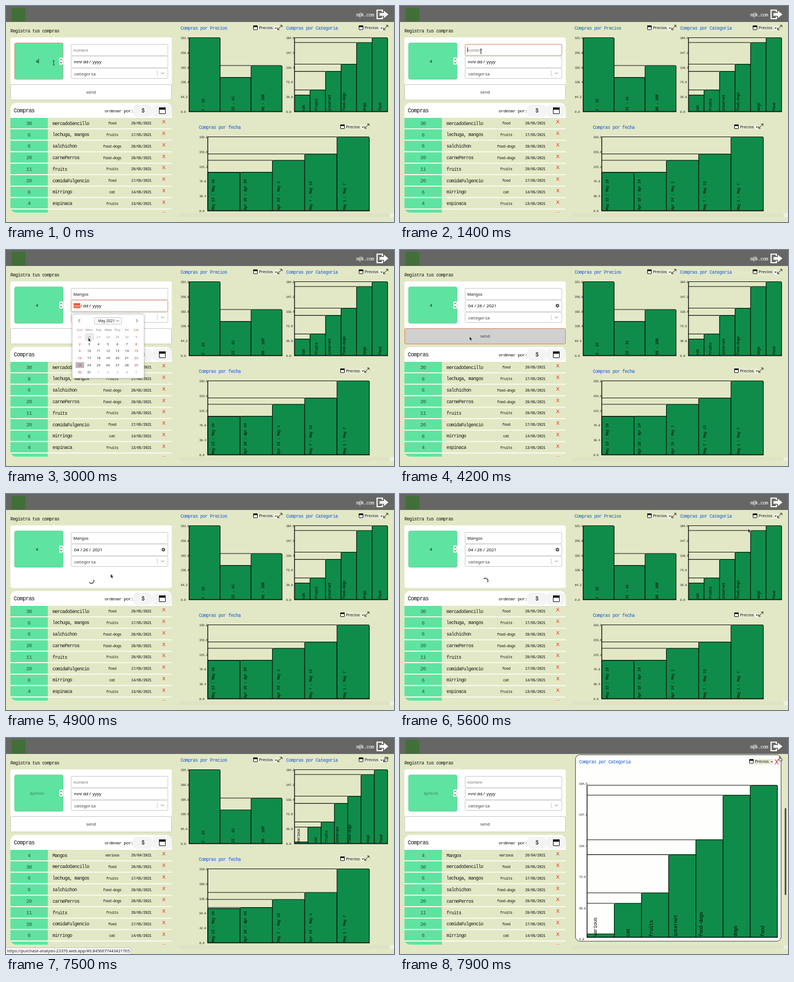
Recreate the animation shown at these times as an HTML page with a canvas. Size 700 by 392 pixels, loop 8 s.

```html
<!DOCTYPE html>
<html lang="es">
<head>
<meta charset="utf-8">
<title>Registro de compras</title>
<style>
html, body { margin: 0; width: 100%; height: 100%; overflow: hidden; background: #e2e8c5; }
canvas { display: block; }
</style>
</head>
<body>
<canvas id="stage" width="700" height="392"></canvas>
<script>
const g = document.getElementById('stage').getContext('2d');
const MONO = '"Liberation Mono", monospace';
const SANS = '"Noto Sans", "Open Sans", sans-serif';
const PAPER = '#e2e8c5', MINT = '#5fe3a1', GREEN = '#0f8c49', ORANGE = '#dd8262', LINE = '#c9c9c9';
const LOOP = 8000, STEP = 100;
const at = { nameFocus: 1200, typing: 1500, dateFocus: 2500, popup: 2600, picked: 3200,
  hover: 3800, press: 4100, loading: 4400, saved: 6500, link: 7300, modal: 7700 };

function box(x, y, w, h, fill, stroke, r = 0, line = 1) {
  g.beginPath();
  g.roundRect(x, y, w, h, r);
  if (fill) { g.fillStyle = fill; g.fill(); }
  if (stroke) { g.strokeStyle = stroke; g.lineWidth = line; g.stroke(); }
}

function setFont(size, font) {
  g.font = size + 'px ' + font;
  g.letterSpacing = font === MONO ? -.07 * size + 'px' : '0px';
}

function text(s, x, y, size = 8.3, color = '#111', align = 'left', font = MONO) {
  setFont(size, font);
  g.fillStyle = color;
  g.textAlign = align;
  g.fillText(s, x, y);
}

function path(points, color, line = 1, fill) {
  g.beginPath();
  for (let i = 0; i < points.length; i += 2) g.lineTo(points[i], points[i + 1]);
  if (fill) { g.closePath(); g.fillStyle = fill; g.fill(); }
  g.strokeStyle = color;
  g.lineWidth = line;
  g.stroke();
}

function placed(x, y, draw) {
  g.save();
  g.translate(x, y);
  draw();
  g.restore();
}

function calendarIcon(x, y, s) {
  box(x + .5, y + .5, s - 1, s - 1, '#fff', '#111', .5);
  box(x, y, s, s * .36, '#111');
}

function header() {
  box(0, 0, 700, 29, '#666664');
  box(10, 3, 25, 25, '#416f38');
  text('m@k.com', 632, 19, 8.6, '#fff');
  path([679, 11, 679, 7.5, 669.5, 7.5, 669.5, 23, 679, 23, 679, 19.5], '#fff', 2.2);
  path([674, 13, 682, 13, 682, 9, 689.5, 15.3, 682, 21.5, 682, 17.5, 674, 17.5], '#fff', .5, '#fff');
}

function form(t) {
  const saved = t >= at.saved, loading = t >= at.loading && !saved;
  const caret = t % 1000 < 500;
  text('Registra tus compras', 8, 47.5);
  box(8, 57, 291, loading ? 113.5 : 86, '#fff', null, 3);

  box(15.5, 67, 87.5, 66, MINT, t < at.nameFocus ? ORANGE : '#55cc91', 3, .8);
  if (saved) text('$precio', 56, 102.5, 7.3, '#3d7f60', 'center', SANS);
  else text('4', 56, 103, 7.6, '#111', 'center', SANS);
  if (t < at.nameFocus && caret) box(58.3, 96, .9, 8, '#111');
  box(96, 93.5, 7, 13, '#f4f4f0', null, 1.5);
  path([98, 98, 99.5, 96, 101, 98], '#333', .9);
  path([98, 102, 99.5, 104, 101, 102], '#333', .9);

  const nameOn = t >= at.nameFocus && t < at.dateFocus;
  const dateOn = t >= at.dateFocus && t < at.press;
  box(117.5, 69.5, 174.5, 20.5, '#fff', nameOn ? ORANGE : LINE, 2);
  const typed = saved ? '' : 'Mangos'.slice(0, Math.max(0, Math.floor((t - at.typing) / 100)));
  text(typed || 'nombre', 121.5, 82.5, 7.2, typed ? '#111' : '#777', 'left', SANS);
  if (nameOn && caret) box(121.5 + (typed ? g.measureText(typed).width : 0), 75, .9, 9, '#111');

  box(117.5, 91, 174.5, 21, '#fff', dateOn ? ORANGE : LINE, 2);
  const filled = t >= at.picked && !saved;
  const editing = dateOn && !filled;
  if (editing) box(122, 96.5, 12, 9, '#e8552b');
  const parts = filled ? ['04', '26', '2021'] : ['mm', 'dd', 'yyyy'];
  [122.8, 139, 156].forEach((x, i) =>
    text(parts[i], x, 104, filled || i ? 7.9 : 6.6, editing && !i ? '#fff' : '#000', 'left', SANS));
  text('/', 134.5, 104, 7.9, '#000', 'left', SANS);
  text('/', 150, 104, 7.9, '#000', 'left', SANS);
  if (filled) {
    g.beginPath();
    g.arc(284, 101, 3.2, 0, 7);
    g.fillStyle = '#555';
    g.fill();
    path([282.8, 99.8, 285.2, 102.2], '#fff', .8);
    path([285.2, 99.8, 282.8, 102.2], '#fff', .8);
  }

  box(117.5, 113, 174.5, 18.5, '#fff', LINE, 2);
  text('categoria', 123, 125.5, 8.1, '#444');
  box(272.5, 117, 1, 11, '#ccc');
  path([279.5, 120.7, 282.3, 123.5, 285.1, 120.7], '#aaa', 1.1);

  if (loading) {
    const turn = (t - 5600) / 1000 * Math.PI * 2;
    g.beginPath();
    g.arc(154, 157.5, 4.6, turn - 2.3, turn + .6);
    g.strokeStyle = '#222';
    g.lineWidth = 1.3;
    g.stroke();
  } else {
    const over = t >= at.hover && !saved;
    box(8.5, 142.5, 290, 28, over ? '#d0d0d0' : '#fff', over && t >= at.press ? ORANGE : LINE, 2);
    text('send', 153.5, 159.2, 7.6, '#334', 'center', SANS);
  }
}

const rows = [
  [30, 'mercadoSencillo', 'food', '20/05/2021'],
  [6, 'lechuga, mangos', 'fruits', '17/05/2021'],
  [6, 'salchichon', 'food-dogs', '20/05/2021'],
  [20, 'carnePerros', 'food-dogs', '20/05/2021'],
  [11, 'fruits', 'fruits', '20/05/2021'],
  [20, 'comidaFulgencio', 'food', '17/05/2021'],
  [6, 'mirringo', 'cat', '14/05/2021'],
  [4, 'espinaca', 'fruits', '13/05/2021'],
  [6, 'papaya', 'fruits', '13/05/2021']
];
const added = [4, 'Mangos', 'various', '26/04/2021'];

function list(saved) {
  g.save();
  g.beginPath();
  g.roundRect(8, 176, 291, 199, 10);
  g.clip();
  box(8, 176, 291, 27, '#fff');
  text('Compras', 14, 193.3, 10.1);
  text('ordenar por:', 178, 193, 8.1);
  box(229, 179, 35, 22, '#f4f4f4', null, 8);
  box(264, 179, 35, 22, '#f4f4f4', null, 8);
  text('$', 246.8, 193, 10, '#111', 'center');
  calendarIcon(276, 184, 12);
  (saved ? [added, ...rows] : rows).slice(0, 9).forEach(([price, name, kind, day], i) => {
    const y = 203 + i * 20.8, base = y + 12.7;
    box(8, y, 67.5, 19, MINT);
    box(8, y + 19, 291, 1.8, '#fbfcf2');
    text(price, 41.5, base, 9.4, '#24523c', 'center');
    text(name, 84, base - .2, 8.3);
    text(kind, 191.5, base - .6, 6.9, '#111', 'center');
    text(day, 244, base - .6, 6.9, '#111', 'center');
    text('X', 284.3, base - 2.6, 9.8, '#e8201c', 'center');
  });
  g.restore();
}

// Bars over an axis, with a guide from the axis to each bar and five scale steps.
function chart(x, y, w, h, bars, o = {}) {
  const { scaleX = x - 15.3, scaleY = y + .5, scaleH = h, size = 7 } = o;
  const max = Math.max(...bars.map(b => b[1]));
  const bw = w / bars.length, bottom = y + h;
  for (let i = 0; i < 6; i++)
    text((max * (5 - i) / 5).toFixed(1), scaleX, scaleY + scaleH * i / 5 + 2, 5.7, '#222');
  bars.forEach(([, v], i) => box(x, bottom - v / max * h - .55, bw * i, 1.1, '#111'));
  bars.forEach(([label, v], i) => {
    const bh = v / max * h, mid = x + bw * (i + .5);
    box(x + bw * i, bottom - bh, bw, bh, GREEN, '#061a0e', Math.min(2, bh / 2), 1.2);
    setFont(size, MONO);
    const shift = 10.3 - g.measureText(label).width / 2;
    placed(mid + shift, bottom - 1, () => {
      g.rotate(-Math.PI / 2);
      text(label, 0, 0, size, '#050505');
    });
  });
  box(x - .7, y, 1.4, h, '#111');
  box(x - .7, bottom - .7, w + 1.4, 1.8, '#111');
}

function picker(x, y) {
  calendarIcon(x, y - 7, 8);
  box(x + 9, y - 7.5, 35, 10, '#e7ebd2');
  text('Precios', x + 10.4, y - .3, 7.4, '#111', 'left', SANS);
  box(x + 38.5, y - 6, 4.5, 8, '#f5f5ee');
  path([x + 39.3, y - 3, x + 42.3, y - 3, x + 40.8, y - 1], '#222', .3, '#222');
}

function expandIcon(x, y) {
  path([x, y, x + 8, y - 8], '#222', 1);
  path([x + 4.5, y - 8, x + 8, y - 8, x + 8, y - 4.5], '#222', 1);
  path([x, y - 3.5, x, y, x + 3.5, y], '#222', 1);
}

const title = (s, x, y) => text(s, x, y, 8.35, '#1457d8');

function scrollTrack() {
  box(311, 376, 381, 7, '#dee3c7');
  box(692, 376, 8, 7, '#eef0e2');
}

const kinds = [['cat', 41], ['fruits', 53.7], ['internet', 100], ['food-dogs', 118], ['dogs', 172], ['food', 184]];

function charts(saved) {
  scrollTrack();
  title('Compras por Precios', 315, 43);
  picker(446, 42.5);
  expandIcon(490, 43);
  chart(330.5, 57.5, 167.5, 134, [['2 - 22', saved ? 325 : 321], ['22 - 41', 148], ['80 - 100', 200]]);

  title('Compras por Categoria', 505.5, 43);
  picker(636.5, 42.5);
  expandIcon(681, 43);
  chart(520.5, 57.5, 168, 134, saved ? [['various', 4], ...kinds] : kinds);

  title('Compras por fecha', 348, 222.5);
  picker(603, 222);
  expandIcon(647, 222);
  chart(364, 237.5, 291.5, 134, saved
    ? [['May 13 : May 19', 97], ['Apr 18 : Apr 24', 100], ['May 7 : May 13', 123], ['Apr 24 : May 1', 143], ['May 1 : May 7', 210]]
    : [['May 13 : May 19', 99.5], ['Apr 18 : Apr 24', 100], ['Apr 24 : May 1', 131], ['May 7 : May 13', 147.5], ['May 1 : May 7', 192]]);
}

function modal() {
  scrollTrack();
  box(316.6, 30.5, 370.9, 338.3, '#fefefd', '#444', 8);
  title('Compras por Categoria', 323, 46);
  picker(630, 45.5);
  text('X', 679, 47.5, 12.5, '#e8201c', 'center');
  chart(337.5, 85.8, 343.5, 275.7, [['various', 4], ...kinds],
    { scaleX: 323, scaleY: 83, scaleH: 282, size: 9.3 });
  box(694, 127, 3, 158, '#555', null, 1.5);
}

function popup() {
  g.save();
  g.shadowColor = 'rgba(0,0,0,.35)';
  g.shadowBlur = 4;
  box(119.5, 116.5, 129.5, 116, '#fff', null, 3);
  g.restore();
  box(119.5, 116.5, 129.5, 116, null, '#ccc', 3, .7);
  path([133.5, 125.5, 130.8, 128.3, 133.5, 131], '#444', 1);
  path([234.8, 125.5, 237.5, 128.3, 234.8, 131], '#444', 1);
  box(159.5, 122.5, 49, 12, '#fafafa', '#bbb', 2, .8);
  text('May 2021', 166, 131, 6.7, '#222', 'left', SANS);
  path([199, 127.5, 201.3, 129.8, 203.6, 127.5], '#444', .9);
  const col = i => 133 + i * 17;
  'Sun Mon Tue Wed Thu Fri Sat'.split(' ').forEach((d, i) =>
    text(d, col(i), 147.3, 6, i % 6 ? '#777' : '#e06060', 'center', SANS));
  box(143.5, 152, 14, 11.5, '#eee', '#ccc', 1, .8);
  box(125.5, 203.5, 15.5, 10.5, '#b9b9b9');
  for (let i = 0; i < 42; i++) {
    const day = new Date(2021, 3, 25 + i), inside = day.getMonth() === 4, weekend = i % 7 % 6 === 0;
    text(day.getDate(), col(i % 7), 159.8 + Math.floor(i / 7) * 12.75, 6,
      weekend ? (inside ? '#dd2020' : '#e79a9a') : (inside ? '#222' : '#999'), 'center', SANS);
  }
}

const track = [[0, 86, 103], [600, 86, 103], [1300, 146, 82], [2200, 146, 82], [2500, 150, 101], [2700, 150, 101],
  [3000, 148.5, 159], [3400, 148.5, 159], [3900, 125.5, 157], [4700, 125.5, 157], [5600, 628, 63], [6500, 636, 60],
  [7300, 684, 35], [8000, 685, 34]];

function pointer(t) {
  const i = track.findIndex(k => k[0] > t), [a, b] = [track[i - 1], track[i]];
  const p = (t - a[0]) / (b[0] - a[0]), e = p * p * (3 - 2 * p);
  placed(a[1] + (b[1] - a[1]) * e, a[2] + (b[2] - a[2]) * e, () => {
    if (t < at.dateFocus) {
      path([-1.5, -4, 1.5, -4], '#222', .9);
      path([-1.5, 4, 1.5, 4], '#222', .9);
      path([0, -4, 0, 4], '#222', .9);
    } else if (t < at.link) {
      path([0, 0, 0, 7.2, 1.6, 5.8, 2.8, 8.3, 4, 7.7, 2.8, 5.3, 5, 5.2], '#eee', .6, '#111');
    } else {
      path([-.6, 0, .8, 0, 1, 2.8, 4.3, 3.6, 4.2, 7.6, -.2, 7.6, -2.5, 4.4, -.6, 4.6, -.6, 0], '#222', .8, '#e8e8e8');
    }
  });
}

function draw(t) {
  const saved = t >= at.saved;
  box(0, 0, 700, 392, PAPER);
  header();
  form(t);
  list(saved);
  if (t >= at.modal) modal();
  else charts(saved);
  if (t >= at.popup && t < at.picked) popup();
  if (t >= at.link && t < at.modal) {
    box(-1, 380.5, 226, 13, '#f6f6f4', '#bbb', 2, .8);
    text('https://purchase-analysis-23370.web.app/#0.8456677443421765', 2, 389, 7.3, '#222', 'left', SANS);
  }
  pointer(t);
}

const start = performance.now();
function tick() {
  const t = (performance.now() - start) % LOOP;
  draw(Math.floor(t / STEP) * STEP);
  requestAnimationFrame(tick);
}
tick();
</script>
</body>
</html>
```
